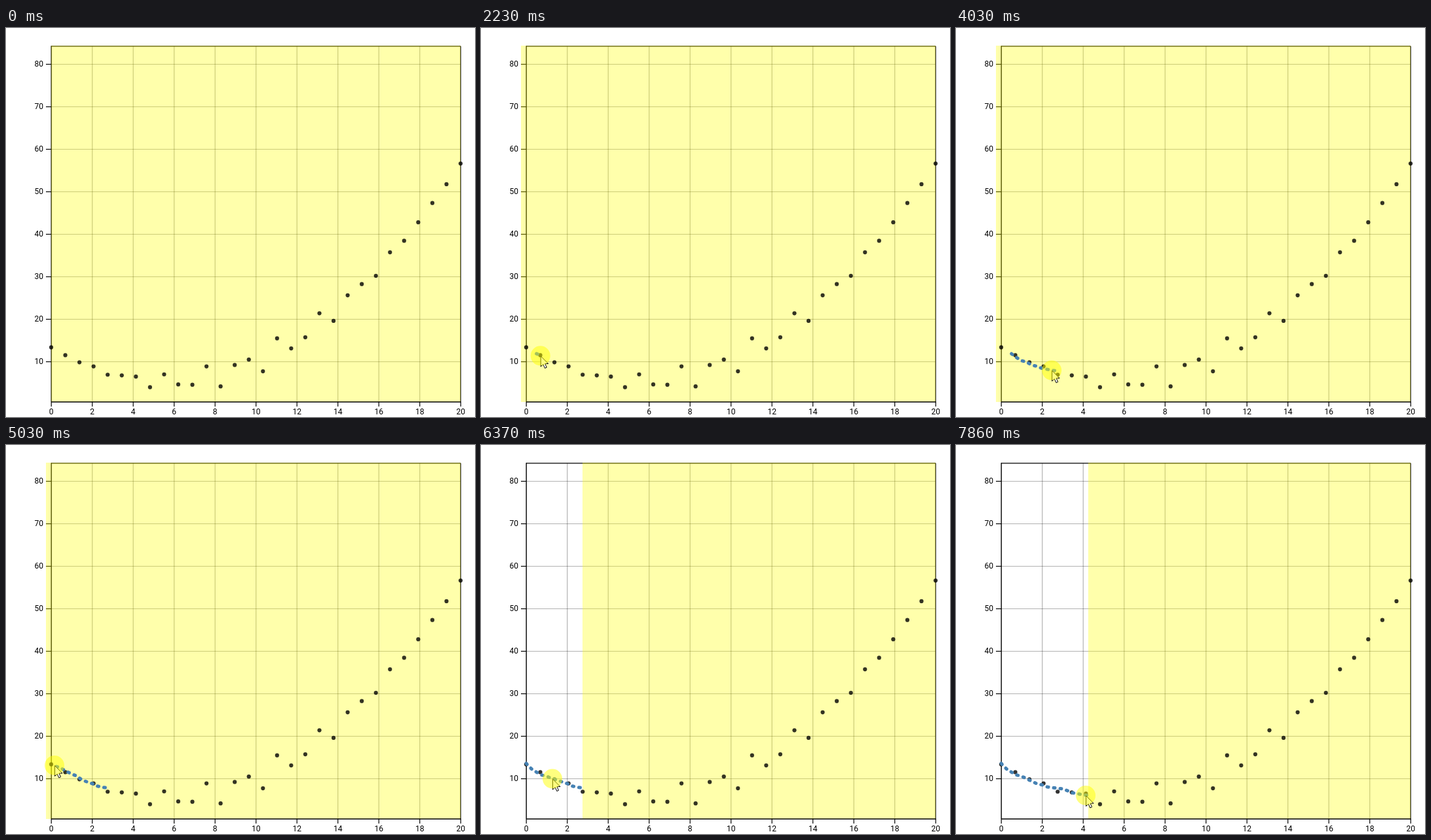
An HTML page with a canvas for the animation above (8000 ms loop, 716x595 px).

```html
<!DOCTYPE html>
<html lang="en">
<head>
<meta charset="utf-8">
<title>Draw the trend</title>
<style>
html, body { margin: 0; width: 100%; height: 100%; overflow: hidden; background: #fff; }
canvas { display: block; }
</style>
</head>
<body>
<canvas id="stage" width="716" height="595"></canvas>
<script>
const ctx = document.getElementById('stage').getContext('2d');
const LOOP = 8000, STEP = 78;
const LEFT = 69, RIGHT = 694, TOP = 27.8, BOTTOM = 572;
const NODE_GAP = 7.8125;      // a quarter unit on the x axis
const PRESS_TIME = 1920;
const POINT_COUNT = 30;

const xAt = v => LEFT + v * 31.25;
const yAt = v => 575.6 - v * 6.507;
const nodeX = i => LEFT + i * NODE_GAP;
const nodeIndex = x => Math.round((x - LEFT) / NODE_GAP);
const lerp = (a, b, u) => a + (b - a) * u;
const clamp01 = u => Math.max(0, Math.min(1, u));

// A parabola with a wobble that is strongest mid-range
const points = Array.from({ length: POINT_COUNT }, (_, i) => {
  const u = i / (POINT_COUNT - 1);
  const x = 20 * u;
  const trend = 0.25 * x * x - 2.84 * x + 13.4;
  const wobble = 3.3 * Math.sin(Math.PI * u) ** 2 * Math.cos(2 * Math.PI * (i - 13.5) / 2.65);
  return [xAt(x), yAt(trend + wobble)];
});

// Cursor strokes: start, end, and where each one arrives
const strokes = [
  { start: 430, end: 1200, x: 87, y: 497 },
  { start: 1350, end: 1670, x: 82, y: 493 },
  { start: 1920, end: 2720, x: 106, y: 510 },
  { start: 2800, end: 2950, x: 126, y: 517.5 },
  { start: 3030, end: 3650, x: 152, y: 524.5 },
  { start: 4030, end: 4810, x: 87, y: 496 },
  { start: 4860, end: 5030, x: 74, y: 490 },
  { start: 5105, end: 5260, x: 69, y: 487 },
  { start: 5740, end: 6370, x: 109, y: 510.5 },
  { start: 6445, end: 6840, x: 143, y: 523 },
  { start: 6990, end: 7310, x: 165, y: 526 },
  { start: 7460, end: 7860, x: 198, y: 536 }
];

function buildTrack() {
  const track = [];
  let from = { x: 100, y: 600 };
  for (const to of strokes) {
    const steps = Math.round((to.end - to.start) / STEP) + 1;
    const bend = to.x > from.x ? 0.7 : 1 / 0.7;   // strokes sag the same way in both directions
    for (let k = 1; k <= steps; k++) {
      const u = k / steps;
      track.push({
        t: lerp(to.start, to.end, (k - 1) / (steps - 1)),
        x: lerp(from.x, to.x, u),
        y: lerp(from.y, to.y, u ** bend)
      });
    }
    from = to;
  }
  return track;
}
const track = buildTrack();

// Each node takes the height at which the pressed cursor last passed it
function stateAt(t) {
  const nodes = [];
  let cursor = null;
  for (const s of track) {
    if (s.t > t + 2) break;
    if (s.t >= PRESS_TIME) {
      const prev = cursor.t >= PRESS_TIME ? cursor : s;
      const ends = [nodeIndex(prev.x), nodeIndex(s.x)];
      for (let i = Math.min(...ends); i <= Math.max(...ends); i++) {
        const u = s.x === prev.x ? 1 : clamp01((nodeX(i) - prev.x) / (s.x - prev.x));
        nodes[i] = lerp(prev.y, s.y, u);
      }
    }
    cursor = s;
  }
  return { nodes, cursor, pressed: cursor !== null && cursor.t >= PRESS_TIME };
}

function line(x1, y1, x2, y2, width, color = '#000') {
  ctx.strokeStyle = color;
  ctx.lineWidth = width;
  ctx.beginPath();
  ctx.moveTo(x1, y1);
  ctx.lineTo(x2, y2);
  ctx.stroke();
}

function disc(x, y, r, color) {
  ctx.fillStyle = color;
  ctx.beginPath();
  ctx.arc(x, y, r, 0, Math.PI * 2);
  ctx.fill();
}

function label(text, x, y, align) {
  ctx.font = '12px Roboto, Arial, sans-serif';
  ctx.textAlign = align;
  ctx.fillStyle = '#000';
  ctx.fillText(text, x, y);
}

function drawAxes() {
  const grid = 'rgba(0,0,0,0.3)';
  for (let v = 10; v <= 80; v += 10) {
    const y = Math.floor(yAt(v)) + 0.5;
    line(LEFT, y, RIGHT, y, 1.2, grid);
    line(61, y, LEFT, y, 1.2);
    label(v, 57, y + 3.7, 'right');
  }
  for (let v = 0; v <= 20; v += 2) {
    const x = xAt(v) + 0.2;
    if (v > 0 && v < 20) line(x, TOP, x, BOTTOM, 1.2, grid);
    line(x, BOTTOM, x, 579, 1.2);
    label(v, x, 591, 'center');
  }
  line(LEFT, TOP, RIGHT, TOP, 1.2);
  line(RIGHT, TOP, RIGHT, BOTTOM, 1.3);
  line(LEFT + 0.2, TOP - 0.6, LEFT + 0.2, BOTTOM, 1.4);
}

function drawCurve(nodes) {
  ctx.save();
  ctx.strokeStyle = 'steelblue';
  ctx.lineWidth = 5;
  ctx.lineCap = ctx.lineJoin = 'round';
  ctx.setLineDash([2, 8]);
  ctx.beginPath();
  nodes.forEach((y, i) => ctx.lineTo(nodeX(i), y));
  ctx.stroke();
  ctx.restore();
}

function drawCursor({ x, y }) {
  ctx.save();
  ctx.translate(x + 0.5, y + 0.5);
  const arrow = new Path2D('M0 0V16L3.7 12.6L6.3 18.5L9 17.3L6.5 11.6H11.5Z');
  ctx.fillStyle = '#fff';
  ctx.fill(arrow);
  ctx.strokeStyle = '#000';
  ctx.lineWidth = 1;
  ctx.stroke(arrow);
  ctx.restore();
}

function draw(t) {
  const { nodes, cursor, pressed } = stateAt(t);
  ctx.fillStyle = '#fff';
  ctx.fillRect(0, 0, 716, 595);
  drawAxes();

  // The cover shrinks to the undrawn part once the curve reaches the left axis
  let edge = pressed ? 61 : LEFT;
  if (nodes[0] !== undefined) edge = nodeX(nodes.length - 1);
  ctx.fillStyle = 'rgba(255,255,0,0.33)';
  ctx.fillRect(edge, 27, RIGHT - edge, BOTTOM - 27);
  line(LEFT, BOTTOM, RIGHT + 0.5, BOTTOM, 1.5);

  for (const [x, y] of points) disc(x, y, 3.1, 'rgba(0,0,0,0.8)');
  drawCurve(nodes);
  if (cursor) drawCursor(cursor);
  if (pressed) disc(cursor.x, cursor.y, 15, 'rgba(255,255,0,0.5)');
}

const startTime = performance.now();
function tick() {
  draw((performance.now() - startTime) % LOOP);
  requestAnimationFrame(tick);
}
tick();
</script>
</body>
</html>
```
